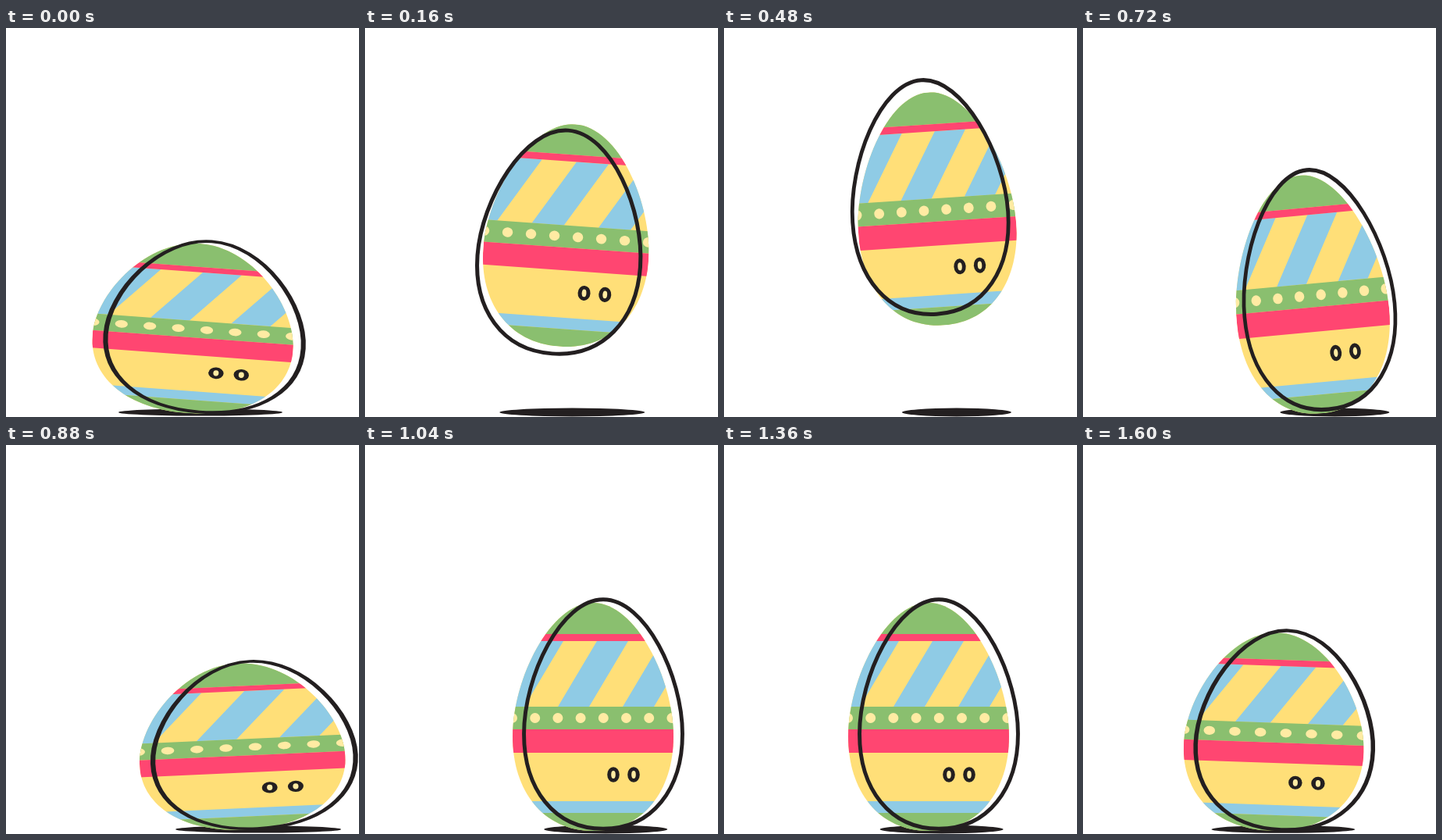
These frames come from a looping animation (452 px wide and 498 px high, 1.68 s). An HTML page without scripts:

```html
<!DOCTYPE html>
<html lang="en">
<head>
<meta charset="utf-8">
<title>Hopping egg</title>
<style>
  html, body { margin: 0; width: 100%; height: 100%; overflow: hidden; background: #fff; }
  svg { display: block; width: 452px; height: 498px; }

  /* The loop is 21 poses of 80 ms each */
  .pose, .lag, .shadow { animation: 1680ms step-end infinite; }
  .pose { animation-name: pose; }
  .lag { animation-name: lag; }
  .shadow { animation-name: slide, spread; }

  .outline { fill: none; stroke: #231f20; stroke-width: 5; vector-effect: non-scaling-stroke; }
  .ink { fill: #231f20; }
  .green { fill: #8abf6f; }
  .pink { fill: #ff4671; }
  .blue { fill: #8fcbe5; }
  .cream { fill: #ffeba3; }
  .dots { stroke: #ffeba3; stroke-width: 13; stroke-linecap: round; stroke-dasharray: 0 29.2; }

  @keyframes pose {
    0%     { translate: 255.5px 382.5px; rotate: 4.2deg; scale: 1.25 .745; }
    4.76%  { translate: 251px 330px; rotate: 4.6deg; scale: 1.11 .88; }
    9.52%  { translate: 250px 274px; rotate: 4.1deg; scale: 1.03 .976; }
    14.28% { translate: 250px 247px; rotate: 2.4deg; scale: 1.01 .995; }
    19.04% { translate: 252px 229px; rotate: .2deg; scale: 1 1.01; }
    23.8%  { translate: 256.5px 219px; rotate: -2deg; scale: .99 1.018; }
    28.57% { translate: 262.5px 216.5px; rotate: -3.8deg; scale: .983 1.023; }
    33.33% { translate: 274px 225px; rotate: -4.8deg; scale: .973 1.03; }
    38.09% { translate: 286.5px 268px; rotate: -5.3deg; scale: .963 1.04; }
    42.85% { translate: 300.5px 335px; rotate: -5.3deg; scale: .951 1.048; }
    47.61% { translate: 310px 360px; rotate: -4deg; scale: 1.11 .9; }
    52.38% { translate: 317px 384px; rotate: -2.6deg; scale: 1.28 .73; }
    57.14% { translate: 312.5px 361px; rotate: -1deg; scale: 1.12 .885; }
    61.9%  { translate: 305px 344.5px; rotate: 0deg; scale: 1 1; animation-timing-function: steps(5); }
    85.71% { translate: 267.5px 344.5px; rotate: 0deg; scale: 1 1; }
    90.47% { translate: 262.5px 351px; rotate: .8deg; scale: 1.04 .955; }
    95.23%, 100% { translate: 258.5px 365px; rotate: 2deg; scale: 1.12 .869; }
  }

  /* Paint drifts behind the ink outline */
  @keyframes lag {
    0%     { translate: -15px 2px; }
    4.76%  { translate: -3px -5px; }
    9.52%  { translate: 9px -8.5px; }
    14.28% { translate: 10px 0; }
    19.04% { translate: 10px 8px; }
    23.8%  { translate: 10px 13px; }
    28.57% { translate: 9px 15px; }
    33.33% { translate: 5px 14px; }
    38.09% { translate: -2px 10px; }
    42.85% { translate: -8.5px 6px; }
    47.61% { translate: -13px 3px; }
    52.38% { translate: -15px 2px; }
    57.14% { translate: -14px 2px; }
    61.9%  { translate: -13px 3.5px; }
    95.23%, 100% { translate: -13.5px 2px; }
  }

  @keyframes slide {
    0%     { translate: 249px 492px; animation-timing-function: steps(10); }
    47.61% { translate: 330.5px 492px; animation-timing-function: steps(11); }
    100%   { translate: 249px 492px; }
  }

  @keyframes spread {
    0%     { scale: 1.05 .85; }
    4.76%  { scale: 1 .95; }
    9.52%  { scale: .93 1; }
    14.28% { scale: .85 1; }
    19.04% { scale: .78 1; }
    23.8%  { scale: .73 1; }
    28.57% { scale: .7 1; }
    47.61% { scale: .88 .95; }
    52.38% { scale: 1.06 .85; }
    57.14% { scale: .92 .9; }
    61.9%  { scale: .79 1; }
    90.47% { scale: .84 .95; }
    95.23%, 100% { scale: .92 .9; }
  }
</style>
</head>
<body>
<svg viewBox="0 0 452 498">
  <defs>
    <path id="shell" d="M0-146C55-146 103-48 103 25C103 95 64 146 0 146S-103 95-103 25C-103-48-55-146 0-146Z"/>
    <clipPath id="inside"><use href="#shell"/></clipPath>
    <path id="stripe" class="blue" d="M5-97h40l-50 84h-40z"/>
    <g id="eye">
      <ellipse class="ink" rx="7.8" ry="9.8"/>
      <ellipse class="cream" rx="2.8" ry="5"/>
    </g>
  </defs>

  <ellipse class="shadow ink" rx="100" ry="5.4"/>

  <g class="lag">
    <g class="pose">
      <g clip-path="url(#inside)">
        <rect x="-110" y="-150" width="220" height="300" fill="#ffdf78"/>
        <use href="#stripe" x="-83"/>
        <use href="#stripe"/>
        <use href="#stripe" x="83"/>
        <rect class="green" x="-110" y="-150" width="220" height="44"/>
        <rect class="pink" x="-110" y="-106" width="220" height="9"/>
        <rect class="green" x="-110" y="-13" width="220" height="29"/>
        <path class="dots" d="M-103.5 1.5H110"/>
        <rect class="pink" x="-110" y="16" width="220" height="30"/>
        <rect class="blue" x="-110" y="108" width="220" height="15"/>
        <rect class="green" x="-110" y="123" width="220" height="30"/>
      </g>
      <use href="#eye" x="26" y="74"/>
      <use href="#eye" x="52" y="74"/>
    </g>
  </g>

  <!-- The ink line runs slightly inside the painted width -->
  <g class="pose"><use href="#shell" class="outline" transform="scale(.985 1.005)"/></g>
</svg>
</body>
</html>
```
